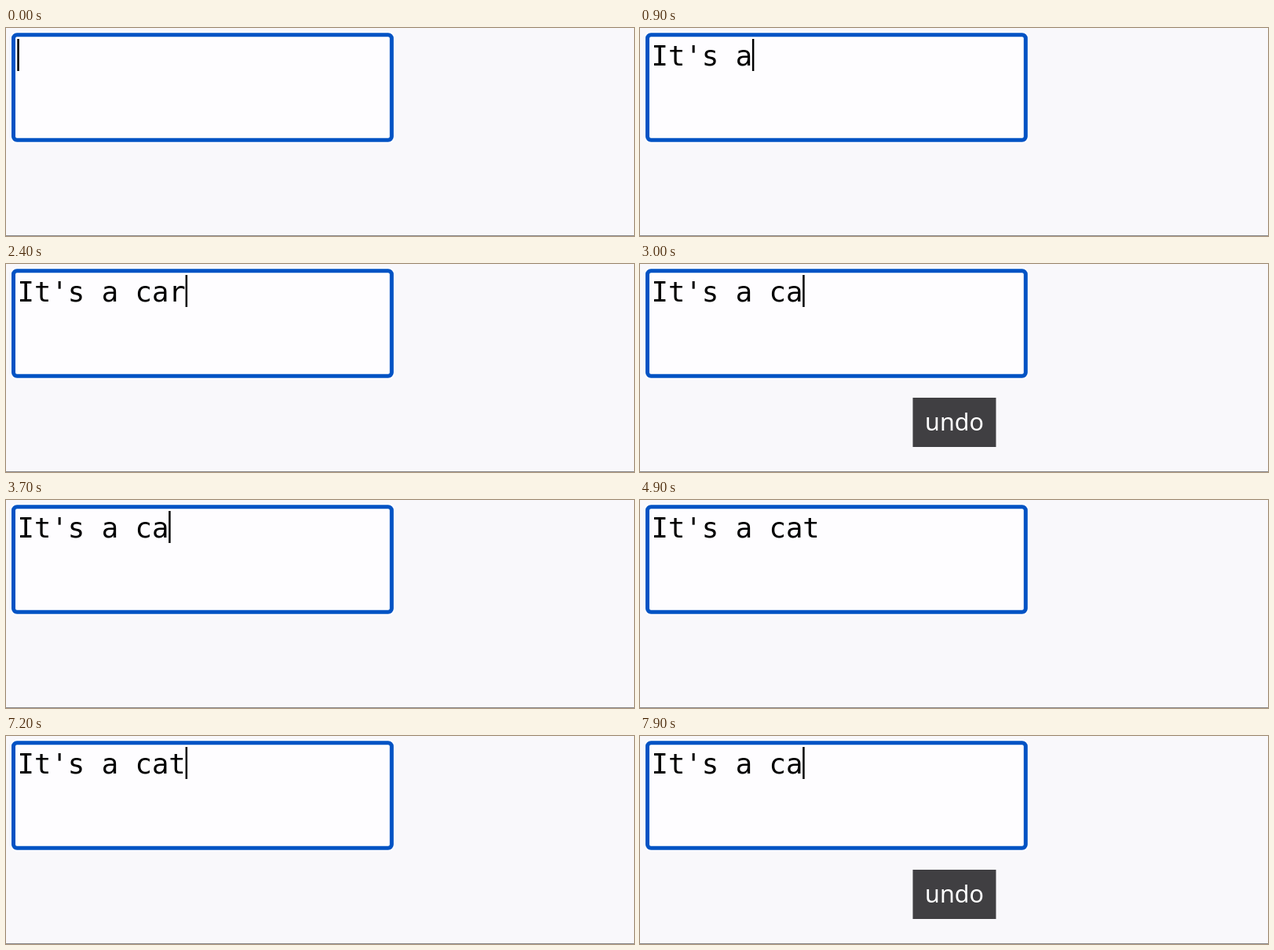
Write an HTML page that moves like this. It is 800 px wide and 266 px high and loops after 8 s.

```html
<!DOCTYPE html>
<html>
<head>
<meta charset="utf-8">
<style>
html, body { margin: 0; width: 100%; height: 100%; overflow: hidden; background: #f9f8fb; }
svg { display: block; }
#typed { font: 35.6px "DejaVu Sans Mono", monospace; white-space: pre; }
#toast text { font: 30.5px "Noto Sans", sans-serif; fill: #fff; text-anchor: middle; }
</style>
</head>
<body>
<svg width="800" height="266" viewBox="0 0 800 266">
  <rect x="5.5" y="4.5" width="490" height="143" rx="8" fill="#fdfcff"/>
  <rect x="9.5" y="8.7" width="481.8" height="134.6" rx="4.5" fill="#fefdff" stroke="#0253c4" stroke-width="5"/>
  <text id="typed" x="14.6" y="47.5"></text>
  <rect id="caret" y="14" width="2.5" height="41"/>
  <g id="toast">
    <rect x="347.5" y="171" width="106" height="63" fill="#403f42"/>
    <text x="400.5" y="213">undo</text>
  </g>
  <rect y="265" width="800" height="1" fill="#8b8a8d"/>
</svg>
<script>
const LOOP = 8000, BLINK = 500, TOAST = 1100, ADVANCE = 21.43;
const $ = id => document.getElementById(id);
const typed = $('typed'), caret = $('caret'), toast = $('toast');

// Each edit: time, resulting text, whether it was an undo
const edits = [[0, '']];
const phrase = "It's a car";
for (let i = 0; i < phrase.length; i++) edits.push([130 + 140 * i, phrase.slice(0, i + 1)]);
const stem = "It's a ca";
edits.push(
  [2580, stem, true], [4180, stem + 't'],
  [5280, stem, true], [6780, stem + 't'],
  [7860, stem, true]
);

function draw(now) {
  const t = now % LOOP;
  const [start, text, undone] = edits.filter(e => e[0] <= t).pop();
  const age = t - start;
  typed.textContent = text;
  caret.setAttribute('x', 14.3 + ADVANCE * text.length);
  caret.style.display = age % (2 * BLINK) < BLINK ? '' : 'none';
  toast.style.display = undone && age < TOAST ? '' : 'none';
}

const origin = performance.now();
function frame() {
  draw(performance.now() - origin);
  requestAnimationFrame(frame);
}
frame();
</script>
</body>
</html>
```
